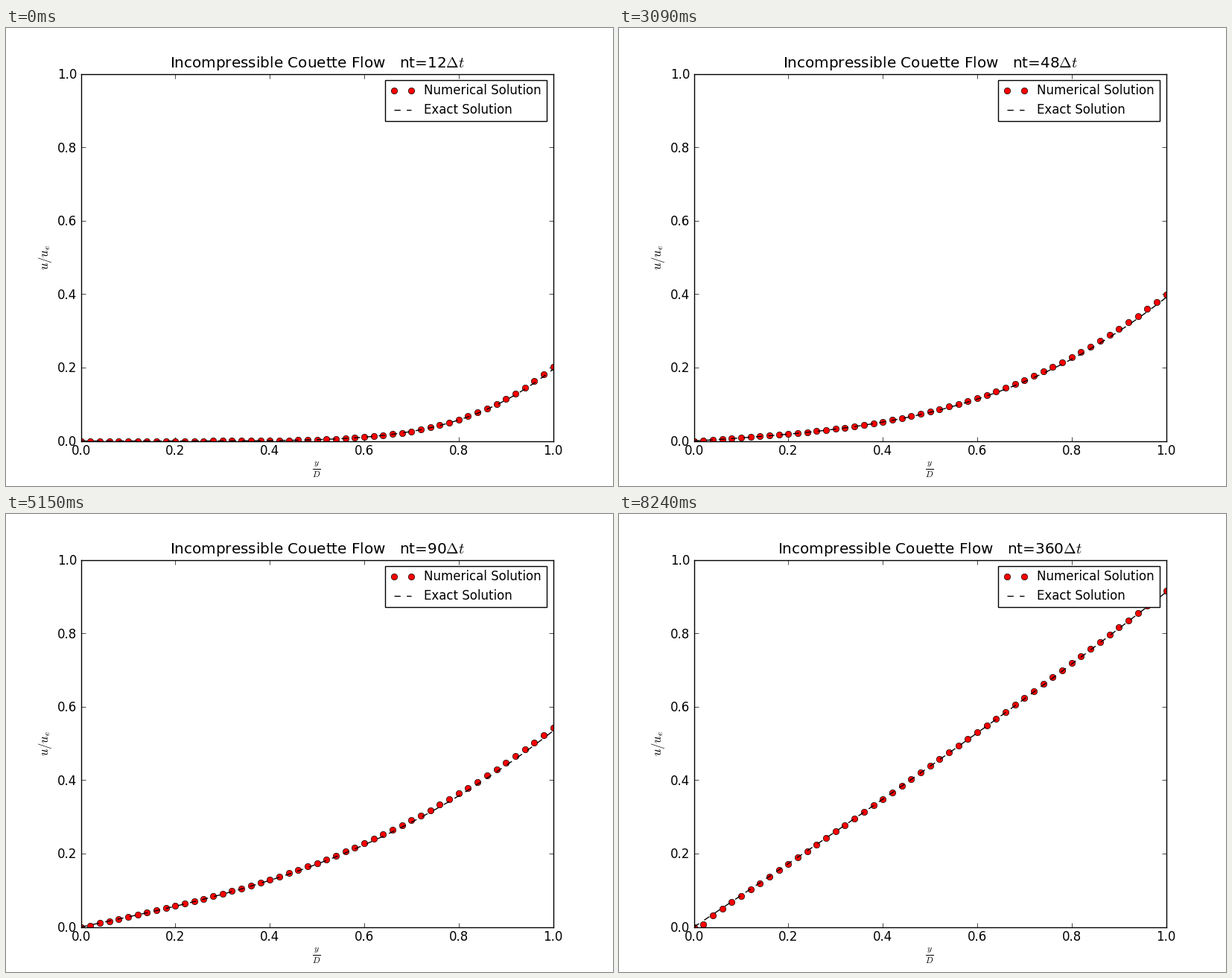
Animation, 815 px wide and 615 px high, one loop 9.27 s. Source, as a matplotlib script:

```python
import numpy as np
import matplotlib.pyplot as plt
from matplotlib.animation import FuncAnimation
from matplotlib.patches import Rectangle
from matplotlib.transforms import ScaledTranslation

W, H, DPI = 815, 615, 100
LEFT, RIGHT, TOP, BOTTOM = 100.6, 734.6, 61.6, 554.6
STEPS = [12, 24, 36, 48, 60, 90, 120, 240, 360]
N, DT = 50, 0.0025
DY = 1 / N
y = np.linspace(0, 1, N + 1)

plt.rcParams.update({
    "font.family": "DejaVu Sans",
    "font.size": 12,
    "mathtext.fontset": "cm",
    "axes.linewidth": 1.0,
    "lines.linewidth": 1.0,
})


def solve_flow(steps):
    """Crank-Nicolson, fixed lower wall, unit shear at the upper wall."""
    e = DT / DY**2
    a, b = -e / 2, 1 + e
    m = np.eye(N + 1)
    for j in range(1, N):
        m[j, j - 1:j + 2] = a, b, a
    m[N, N - 1] = -1
    inv = np.linalg.inv(m)
    u = np.zeros(N + 1)
    saved = {}
    for n in range(1, max(steps) + 1):
        k = np.zeros(N + 1)
        k[1:N] = (1 - e) * u[1:N] + e / 2 * (u[2:] + u[:-2])
        k[N] = DY
        u = inv @ k
        u[1] = k[1] / b  # the sweep stops short of the first inner node
        if n in steps:
            saved[n] = u.copy()
    return saved


def exact(n):
    k = np.arange(60)[:, None]
    q = (2 * k + 1) * np.pi / 2
    terms = 2 * (-1.0)**k / q**2 * np.sin(q * y) * np.exp(-q**2 * n * DT)
    return y - terms.sum(axis=0)


flow = solve_flow(STEPS)
dots = dict(ls="none", marker="o", ms=6, mfc="red", mec="black", mew=0.5)
dashes = dict(color="black", lw=1, dashes=(6, 6), dash_capstyle="butt")

fig = plt.figure(figsize=(W / DPI, H / DPI), dpi=DPI, facecolor="white")
ax = fig.add_axes([LEFT / W, 1 - BOTTOM / H, (RIGHT - LEFT) / W, (BOTTOM - TOP) / H])
ax.set(xlim=(0, 1), ylim=(0, 1))
ax.set_xticks(np.linspace(0, 1, 6))
ax.set_yticks(np.linspace(0, 1, 6))
ax.tick_params(direction="in", length=4, width=0.5, pad=4, top=True, right=True)
lift = ScaledTranslation(0, 0.5 / 72, fig.dpi_scale_trans)
for label in ax.get_xticklabels() + ax.get_yticklabels():
    label.set_transform(label.get_transform() + lift)
title = ax.set_title("", fontsize=14.4, pad=6.5)
numeric, = ax.plot([], [], **dots)
analytic, = ax.plot([], [], **dashes)

# Pixel-space layer for the legend and the axis labels
top = fig.add_axes([0, 0, 1, 1], zorder=5)
top.set(xlim=(0, W), ylim=(H, 0))
top.axis("off")
top.add_patch(Rectangle((509, 70), 217, 55, fc="white", ec="black", lw=1))
top.plot([521.2, 544.4], [84.2, 84.2], **dots)
top.plot([521.2, 544.4], [110.2, 110.2], **dashes)
top.text(561, 89, "Numerical Solution")
top.text(561, 115, "Exact Solution")
top.text(417, 593.5, r"$\frac{y}{D}$", ha="center", va="center")
top.text(53.5, 308, "$u/u_e$", ha="center", va="center", rotation=90)


def draw(i):
    n = STEPS[i]
    numeric.set_data(y, flow[n])
    analytic.set_data(y, exact(n))
    title.set_text(rf"Incompressible Couette Flow   nt={n}$\Delta t$")
    return numeric, analytic, title


anim = FuncAnimation(fig, draw, frames=len(STEPS), interval=1030,
                     repeat=True, repeat_delay=0, blit=False)
plt.show()
```
